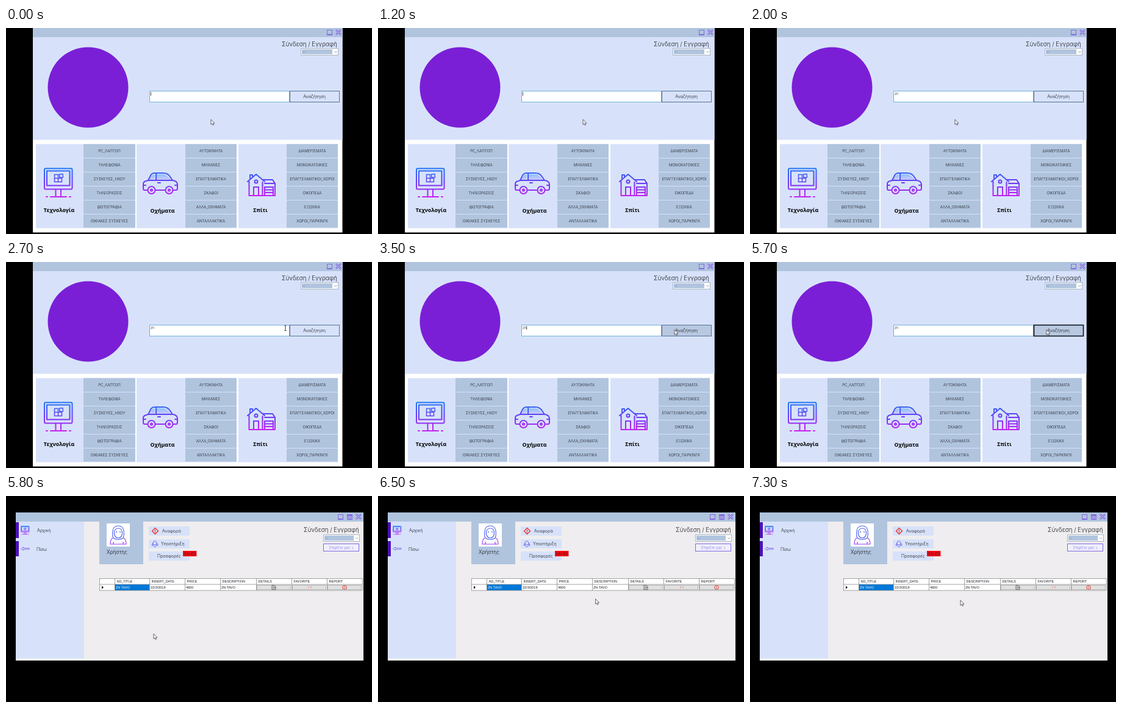
Write an HTML page that moves like this. It is 600x338 px and loops after 7500 ms.

```html
<!DOCTYPE html>
<html lang="el">
<head>
<meta charset="utf-8">
<title>Μικρές αγγελίες</title>
<style>
  html, body { margin: 0; width: 100%; height: 100%; overflow: hidden; background: #000; }
  svg { display: block; width: 100vw; height: 100vh; }
  text { font-family: Inter, "Open Sans", sans-serif; font-weight: 300; fill: #17191f; white-space: pre; }
  .grid { font-family: "Liberation Sans", Arial, sans-serif; font-weight: 400; }
  .bold { font-family: "Open Sans", "Noto Sans", sans-serif; font-weight: 700; fill: #000; }
  .icon { fill: none; stroke: url(#neon); stroke-width: 2; stroke-linejoin: round; stroke-linecap: round; }
</style>
</head>
<body>
<svg viewBox="0 0 600 338">
  <defs>
    <linearGradient id="neon" gradientUnits="userSpaceOnUse" x1="0" y1="230" x2="0" y2="277">
      <stop offset="0" stop-color="#1f78f6"/><stop offset=".5" stop-color="#6a3cf4"/><stop offset="1" stop-color="#c91ff2"/>
    </linearGradient>
    <linearGradient id="glass" x1="0" y1="0" x2="0" y2="1">
      <stop offset="0" stop-color="#8cc0fb"/><stop offset="1" stop-color="#d3c9fb"/>
    </linearGradient>
    <g id="monitor">
      <path d="M65 230.500H106.500Q108.500 230.500 108.500 232.500V262.500Q108.500 264.500 106.500 264.500H65Q63 264.500 63 262.500V232.500Q63 230.500 65 230.500Z
        M67 234.500H104.500V258.500H67Z M81.500 265V276 M90 265V276 M73 277H99 M66 277H68 M104 277H106"/>
      <path d="M79.500 240.500H85.500V246.500H79.500Z M79.500 246.500H85.500V252.500H79.500Z M85.500 246.500H91.500V252.500H85.500Z M87.500 240 93 239.500 93.500 245 88 245.500Z" stroke-width="1.500"/>
    </g>
    <g id="car">
      <path d="M234 250Q238 241 244 240V250Z M247 240H259Q266 243 271 250H247Z" fill="url(#glass)" stroke="none"/>
      <path d="M232 266H227Q225 266 225 263V256Q225 252 230 251L233 250 237 242Q239 238 244 238H258Q265 238 269 244L273 250
        Q281 251 281 257V263Q281 266 279 266H274 M245 266H261 M233 250H273 M246 239V250 M249 254H253 M225 258H229 M277 258H281
        M232.500 266a6 6 0 1 0 12 0a6 6 0 1 0-12 0Z M261.500 266a6 6 0 1 0 12 0a6 6 0 1 0-12 0Z
        M237 266a1.500 1.500 0 1 0 3 0a1.500 1.500 0 1 0-3 0Z M266 266a1.500 1.500 0 1 0 3 0a1.500 1.500 0 1 0-3 0Z"/>
    </g>
    <path id="house" d="M396 252 410 240 424 252 M400 247V241H404V244 M398.500 252V275H441V256 M421 249H437L441 255H424
      M406 275V261H414V275 M407.500 252a2.500 2.500 0 1 0 5 0a2.500 2.500 0 1 0-5 0Z M420.500 253V275
      M424 275V261H438V275 M424 265.500H438 M424 270H438"/>
  </defs>
  <g id="home"></g>
  <g id="results"></g>
  <path id="arrow" d="M0 0V8.500L2 6.800 3.300 9.600 4.600 9 3.400 6.300H6Z" fill="#f6f8ff" stroke="#333" stroke-width=".7"/>
  <path id="beam" d="M-1.500-4H-.3L0-3.700.3-4H1.500M0-3.700V3.700M-1.500 4H1.500" fill="none" stroke="#222" stroke-width=".9"/>
</svg>
<script>
const $ = id => document.getElementById(id);
const STEEL = '#b0c4de', PALE = '#d7e2fa', VIOLET = '#8668e4';

const rect = (x, y, w, h, fill, extra = '') =>
  `<rect x="${x}" y="${y}" width="${w}" height="${h}" fill="${fill}" ${extra}/>`;
const box = (x, y, w, h, fill, stroke, extra = '') =>
  rect(x + .5, y + .5, w - 1, h - 1, fill, `stroke="${stroke}" ${extra}`);
const label = (x, y, size, str, extra = '') =>
  `<text x="${x}" y="${y}" font-size="${size}" ${extra}>${str}</text>`;
const centered = (x, y, size, str, extra = '') =>
  label(x, y, size, str, `text-anchor="middle" ${extra}`);
const line = (d, color, width = 1) =>
  `<path d="${d}" fill="none" stroke="${color}" stroke-width="${width}"/>`;

const combo = (x, y, w, h) =>
  box(x, y, w, h, '#fff', '#aab4c2') + rect(x + 2, y + 2, w - 12, h - 4, STEEL) +
  label(x + 3, y + 7.5, 5, '--') +
  line(`M${x + w - 6.500} ${y + h / 2 - .8}l2 2 2-2`, '#666', .7);

const maximize = (x, y) => box(x, y, 9, 9, 'none', VIOLET) + rect(x, y + 7, 9, 2, VIOLET);
const close = (x, y) =>
  line(`M${x} ${y}l8 8m0-8l-8 8`, VIOLET, 2.6) + line(`M${x} ${y}l8 8m0-8l-8 8`, '#c9cdf0', .8);

const categories = [
  { x: 49, w: 163, split: 78, icon: 'monitor', title: 'Τεχνολογία', titleX: 87, titleY: 302,
    items: 'PC_ΛΑΠΤΟΠ,ΤΗΛΕΦΩΝΙΑ,ΣΥΣΚΕΥΕΣ_ΗΧΟΥ,ΤΗΛΕΟΡΑΣΕΙΣ,ΦΩΤΟΓΡΑΦΙΑ,ΟΙΚΙΑΚΕΣ ΣΥΣΚΕΥΕΣ' },
  { x: 214, w: 164, split: 80, icon: 'car', title: 'Οχήματα', titleX: 256.5, titleY: 303,
    items: 'ΑΥΤΟΚΙΝΗΤΑ,ΜΗΧΑΝΕΣ,ΕΠΑΓΓΕΛΜΑΤΙΚΑ,ΣΚΑΦΟΙ,ΑΛΛΑ_ΟΧΗΜΑΤΑ,ΑΝΤΑΛΛΑΚΤΙΚΑ' },
  { x: 381, w: 163, split: 79, icon: 'house', title: 'Σπίτι', titleX: 417, titleY: 302,
    items: 'ΔΙΑΜΕΡΙΣΜΑΤΑ,ΜΟΝΟΚΑΤΟΙΚΙΕΣ,ΕΠΑΓΓΕΛΜΑΤΙΚΟΙ_ΧΩΡΟΙ,ΟΙΚΟΠΕΔΑ,ΕΞΩΧΙΚΑ,ΧΩΡΟΙ_ΠΑΡΚΙΝΓΚ' }
];

function categoryCard({ x, w, split, icon, title, titleX, titleY, items }) {
  const left = x + split, width = w - split;
  const rows = items.split(',').map((item, i) =>
    centered(left + width / 2, 203.5 + 23 * i, 6.1, item) +
    (i ? rect(left, 190 + 23 * i, width, 1, PALE) : '')).join('');
  return rect(x, 190.5, w, 138, PALE) + rect(left, 190.5, width, 137, STEEL) + rows +
    `<use href="#${icon}" class="icon"/>` + centered(titleX, titleY, 8.8, title, 'class="bold"');
}

$('home').innerHTML =
  rect(44, 0, 507.5, 335.5, '#fff') + rect(44, 0, 507.5, 183.5, PALE) + rect(44, 0, 507.5, 15, STEEL) +
  maximize(526, 3) + close(541, 3) +
  '<circle cx="134.500" cy="97.500" r="66" fill="#7a1fd6"/>' +
  label(452, 30, 9.7, 'Σύνδεση / Εγγραφή') + combo(483, 33, 62, 12) +
  box(235, 103, 230, 19, '#fff', '#6fb0dc') +
  box(465, 103, 82, 19, PALE, '#55719a', 'id="search"') +
  centered(505.5, 115, 7.1, 'Αναζήτηση') +
  label(237, 109.5, 5.5, '', 'id="query"') +
  rect(237, 105, .8, 6, '#222', 'id="caret"') +
  categories.map(categoryCard).join('');

const tableX = [153, 178, 235, 293, 351, 410, 468, 526, 584];
const headers = ['', 'AD_TITLE', 'INSERT_DATE', 'PRICE', 'DESCRIPTION', 'DETAILS', 'FAVORITE', 'REPORT'];
const cells = ['', 'ZN TAVO', '22/3/2019', '4600', 'ZN TAVO'];

function table() {
  let out = rect(153, 135, 431, 20, '#fff');
  headers.forEach((head, i) => {
    const x = tableX[i], w = tableX[i + 1] - x;
    if (i === 1) out += rect(x, 145, w, 10, '#0078d7');
    out += label(x + 3.5, 142, 5.5, head, 'class="grid"');
    if (i > 4) out += box(x + 1, 146, w - 2, 8, '#e1e1e1', '#b5b5b5');
    else out += label(x + 2, 152, 5.5, cells[i] || '', `class="grid" ${i === 1 ? 'style="fill:#fff"' : ''}`);
  });
  return out + line(tableX.map(x => `M${x + .5} 135V155`).join('') + 'M153 135.500H584M153 145H584M153 155H584', '#8c8c8c', .8) +
    '<path d="M157 147.500l3 2.500-3 2.500z"/>' +
    line('M436 146.500h4l2 2v5h-6zM437.500 149h3M437.500 151h2M439 152l3-3', '#444', .8) +
    line('M495 148l2 1.500m2 0l2-1.500M495 151l2-1m2 0l2 1', '#e58a80', .9) +
    '<circle cx="555" cy="150" r="3.300" fill="none" stroke="#e23b32"/>' + line('M555 148v2.500m0 .7v.8', '#e23b32', .9);
}

const menuButton = (y, x, text) => rect(234, y, 67, 15, PALE) + label(x, y + 10, 7, text);

$('results').innerHTML =
  rect(16, 27, 570, 243, '#efedef') + rect(16, 266, 570, 4, '#f1f5f1') +
  rect(16, 27, 570, 15, STEEL) + rect(16, 42, 112, 224.5, PALE) +
  maximize(544, 30) + box(559, 30, 9, 9, 'none', VIOLET) + rect(559, 30, 9, 3, VIOLET) +
  box(561, 34, 5, 4, 'none', VIOLET) + close(574, 30) +
  rect(16, 43, 5, 26, '#4b13b5') + rect(16, 74, 5, 25, '#4b13b5') +
  '<use href="#monitor" class="icon" transform="translate(6.500 -17.500) scale(.29)" style="stroke-width:3"/>' +
  label(51, 58.5, 7, 'Αρχική') +
  line('M24.500 86.500l4-2.700v1.700h9.500v2h-9.500v1.700z', VIOLET, .9) + label(50, 89.5, 7, 'Πίσω') +
  rect(153, 42, 72, 70, STEEL) + rect(165, 45, 38, 38, '#fff') +
  line('M176 69Q174 65 175 57Q176 49 184 49Q192 49 193 57Q194 65 192 69Q184 74 176 69ZM177.500 62Q177 53 184 53Q191 53 190.500 62Q189 69 184 69Q179 69 177.500 62Z', '#5367ee', 1.2) +
  line('M175 69Q171 71 171 79H197Q197 71 193 69M176 75V79M192 75V79', '#9a3bf0', 1.2) +
  '<path d="M181 58v2m6-2v2" stroke="#5367ee" stroke-width="1.400"/>' +
  label(165, 95, 8.3, 'Χρήστης') +
  menuButton(50, 256, 'Αναφορά') + menuButton(71, 254, 'Υποστήριξη') + menuButton(91, 248, 'Προσφορές') +
  line('M244.500 52.500l5 5-5 5-5-5zM244.500 55.500v3m0 .8v1', '#e8292d', 1.3) +
  line('M241 76l3-2.500 3 2.500v4h-6zM241 77l-2 4h3m5-4l2 4h-3M242 83h4', '#6a6be8', 1) +
  rect(290, 90, 22.5, 9, '#f50a14') + centered(301.2, 97, 6.2, 'SALES') +
  label(488, 58.5, 9.7, 'Σύνδεση / Εγγραφή') + combo(520, 63, 60, 12) +
  box(520, 78, 59, 13, '#eef0fb', VIOLET) +
  centered(549.5, 87, 5.7, 'Στηρίξτε μας :)', `style="fill:${VIOLET}"`) +
  table();

// Pointer path: time, x, y
const pointerPath = [
  [0, 336, 150], [2000, 336, 150], [2500, 458, 108.5], [2800, 458, 108.5], [3100, 486, 111], [5700, 486, 111],
  [5800, 242, 226], [5900, 242, 226], [6400, 356, 169], [6700, 358, 168], [7300, 345, 171]
];

function pointerAt(t) {
  const next = pointerPath.findIndex(p => p[0] > t);
  if (next < 0) return pointerPath.at(-1).slice(1);
  const [t0, x0, y0] = pointerPath[next - 1], [t1, x1, y1] = pointerPath[next];
  const k = (t - t0) / (t1 - t0), ease = k * k * (3 - 2 * k);
  return [x0 + (x1 - x0) * ease, y0 + (y1 - y0) * ease];
}

const LOOP = 7500, STEP = 100;

function draw(now) {
  const t = Math.min(Math.floor((now % LOOP) / STEP) * STEP, 7300);
  const onResults = t >= 5800;
  $('home').style.display = onResults ? 'none' : '';
  $('results').style.display = onResults ? '' : 'none';

  const [x, y] = pointerAt(t);
  const overInput = !onResults && x > 235 && x < 465 && y > 103 && y < 122;
  const overButton = !onResults && x >= 465;
  $('arrow').style.display = overInput ? 'none' : '';
  $('beam').style.display = overInput ? '' : 'none';
  $(overInput ? 'beam' : 'arrow').setAttribute('transform', `translate(${x} ${y})`);

  const pressed = t >= 5300;
  const typed = 'zn'.slice(0, t < 1600 ? 0 : t < 1800 ? 1 : 2);
  $('query').textContent = typed;
  $('caret').setAttribute('x', 237 + typed.length * 3.2);
  $('caret').style.display = !pressed && t % 1060 < 530 ? '' : 'none';
  $('search').setAttribute('fill', overButton ? '#b8c8e0' : PALE);
  $('search').setAttribute('stroke', pressed ? '#0c1420' : '#55719a');
  $('search').setAttribute('stroke-width', pressed ? 1.6 : 1);
  requestAnimationFrame(() => draw(performance.now()));
}
draw(0);
</script>
</body>
</html>
```
